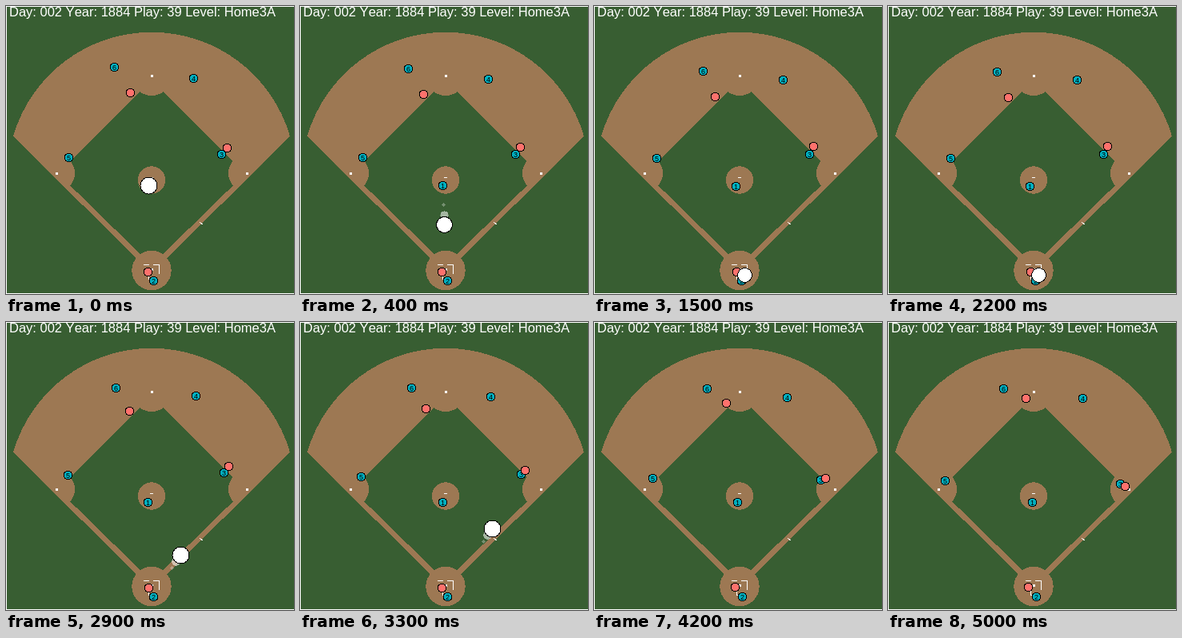
Write an HTML page that moves like this. It is 360 px wide and 360 px high and loops after 5100 ms.

```html
<!DOCTYPE html>
<html>
<head>
<meta charset="utf-8">
<style>
html, body { margin: 0; width: 100%; height: 100%; overflow: hidden; background: #385e32; }
svg { display: block; width: 360px; height: 360px; shape-rendering: crispEdges; }
.title { font: 16.5px "Liberation Sans", Arial, sans-serif; font-kerning: none; fill: #fff; }
.player circle { stroke: #000; }
.player text { font: 9px "Liberation Sans", Arial, sans-serif; text-anchor: middle; fill: #000; }
.lines { fill: none; stroke: #fff; }
</style>
</head>
<body>
<svg viewBox="0 0 360 360">
  <defs>
    <path id="fan" d="M9 163A180 180 0 0 1 355 163L182 334Z"/>
    <clipPath id="fair"><use href="#fan"/></clipPath>
  </defs>
  <rect width="360" height="360" fill="#385e32"/>
  <g fill="#9d7853">
    <use href="#fan"/>
    <path d="M182 92.5L299 209.5L182 324L65 209.5Z" fill="#385e32"/>
    <g clip-path="url(#fair)">
      <circle cx="63" cy="209" r="23"/>
      <circle cx="301" cy="209" r="23"/>
      <circle cx="182" cy="87" r="25"/>
    </g>
    <circle cx="182" cy="217.5" r="17.2"/>
    <circle cx="182" cy="330.5" r="24.7"/>
  </g>
  <path fill="#fff" d="M62 208h3v3h-3zM300 208h3v3h-3zM181 86h3v3h-3zM181 328h3v3h-3z"/>
  <path class="lines" d="M180 214.5h4M242 270l4.5 3.5M172 323.5h7M184 323.5h7.5V335M178.5 335v6.5h2"/>
  <path class="lines" d="M360 .5H.5V359.5H360"/>
  <text class="title" x="4" y="13">Day: 002 Year: 1884 Play: 39 Level: Home3A</text>
  <g id="players"></g>
  <g id="ball" fill="#fff"></g>
</svg>
<script>
const NS = 'http://www.w3.org/2000/svg';
const STEP = 100, LAST = 50;
const PITCHED = 9, THROWN = 24, CAUGHT = 40;

// label, then place at the start, at the throw and at the end; runners have no label
const TEAM = [
  ['1', [178, 224], [177, 225], [180, 225]],
  ['', [177, 332], [178, 332], [175, 331]],
  ['2', [184, 343], [184, 343], [185, 343]],
  ['3', [269, 185], [269, 185], [290, 202]],
  ['4', [234, 90], [236, 92], [243, 95]],
  ['5', [78, 189], [78, 190], [71, 198]],
  ['6', [135, 76], [136, 82], [144, 83]],
  ['', [155, 108], [150, 114], [172, 95]],
  ['', [276, 177], [274, 175], [296, 205]]
];
const MOUND = [178, 224], PLATE = [183, 334], GLOVE = [188, 336], FIRST = [277.5, 200];

const mix = (a, b, p) => a.map((v, i) => v + (b[i] - v) * p);
const span = (s, from, to) => Math.min(1, Math.max(0, (s - from) / (to - from)));

function add(parent, tag, attrs = {}) {
  const el = document.createElementNS(NS, tag);
  for (const k in attrs) el.setAttribute(k, attrs[k]);
  return parent.appendChild(el);
}

// Slow down before the throw, then run evenly
function playerAt([, from, mid, to], s) {
  const turn = THROWN + 1;
  return s < turn
    ? mix(from, mid, 1 - (1 - s / turn) ** 2)
    : mix(mid, to, span(s, turn, LAST));
}

// Pitch, held by the catcher, throw to first
function ballAt(s) {
  if (s <= PITCHED) {
    const p = span(s, 0, PITCHED);
    return { pos: mix(MOUND, PLATE, p), r: 10.5 - 5.5 * p ** 3 };
  }
  const p = span(s, THROWN - 0.5, CAUGHT);
  const height = 9 + 20 * p * (1 - p);
  return { pos: mix(GLOVE, FIRST, p), r: Math.min(10.5, height) - 4 * p ** 8 };
}

const players = TEAM.map(member => {
  const label = member[0];
  const g = add(document.getElementById('players'), 'g', { class: 'player' });
  add(g, 'circle', { cx: 0.5, cy: 0.5, r: 5.4, fill: label ? '#00b0c0' : '#ff716c' });
  add(g, 'text', { x: 0.5, y: 4 }).textContent = label;
  return { g, member };
});

const ball = document.getElementById('ball');
const far = add(ball, 'circle', { 'fill-opacity': 0.3 });
const near = add(ball, 'circle', { 'fill-opacity': 0.55 });
const main = add(ball, 'circle', { stroke: '#000' });

function place(el, [x, y], r) {
  el.setAttribute('cx', Math.round(x) + 0.5);
  el.setAttribute('cy', Math.round(y) + 0.5);
  el.setAttribute('r', r);
}

function draw(s) {
  for (const { g, member } of players)
    g.setAttribute('transform', `translate(${playerAt(member, s).map(Math.round)})`);
  ball.style.display = s <= CAUGHT ? '' : 'none';
  const moving = (s > 0 && s <= PITCHED) || s > THROWN;
  const now = ballAt(s);
  place(main, now.pos, now.r);
  [near, far].forEach((el, i) => {
    const { pos, r } = ballAt(s - 1 - i);
    place(el, pos, moving ? r * (0.5 - 0.3 * i) : 0);
  });
}

const start = performance.now();
let last = -1;
function tick() {
  const s = Math.floor((performance.now() - start) / STEP) % (LAST + 1);
  if (s !== last) draw(last = s);
  requestAnimationFrame(tick);
}
tick();
</script>
</body>
</html>
```
